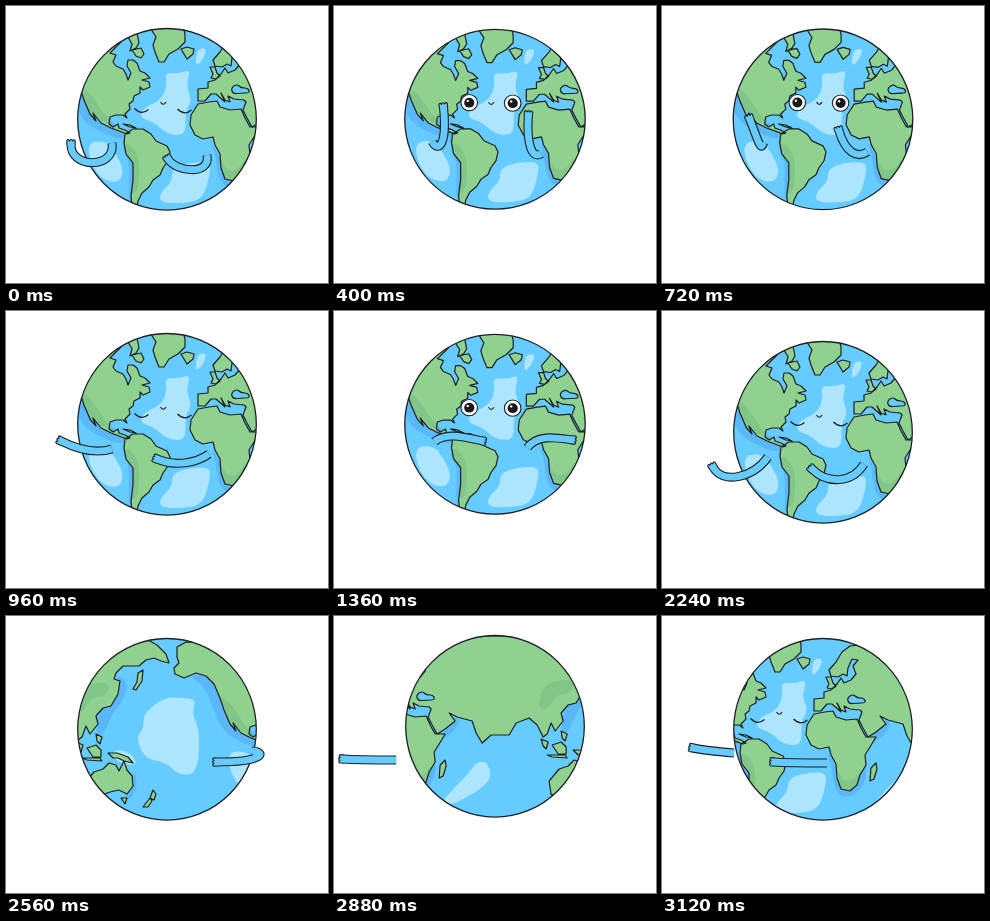
These frames come from a looping animation (322x277 px, 3200 ms). An HTML page with a canvas:

```html
<!DOCTYPE html>
<html lang="en">
<head>
<meta charset="utf-8">
<title>Dancing Earth</title>
<style>
html, body { margin: 0; width: 322px; height: 277px; overflow: hidden; background: #fff; }
canvas { display: block; }
</style>
</head>
<body>
<canvas id="stage" width="322" height="277"></canvas>
<script>
const ctx = document.getElementById('stage').getContext('2d');
const LOOP = 3200, STEP = 80, MAP_W = 420, CX = 161, CY = 113.3;
const INK = '#1d1f22', SEA = '#66ccff', DEEP = '#5ab8f8', LIGHT = '#ade5ff';
const LAND = '#8fd18f', LAND_DARK = '#81c588';

// Shapes facing the Atlantic, and those facing the Pacific (moved by EAST).
const EAST = 280;
const westLand = [
  // North America
  'M31 31L40 26L110 28L115 36L109 42L104 47L110 49L107 56L110 60L117 63L120 68L122 74L125 67L121 60L122 54L127 54L131 57L134 65L139 67L144 72L136 74L143 76L144 81L137 84L134 81L134 87L128 90L127 95L123 98L124 103L119 108L121 112L117 109L110 109L104 111L103 118L107 121L112 118L113 122L119 124L124 127L121 128L105 122L95 117L87 107L90 115L84 108L78 94L74 82L68 68L60 60L50 57L38 62L29 58L28 52L33 47L31 41Z',
  // Caribbean and Arctic islands
  'M117 118L124 119L130 122L124 121Z',
  'M122 31L131 27L133 37L130 42L124 45L126 38Z',
  'M126 44L135 42L138 48L135 52L130 50Z',
  // South America
  'M119 128L127 123L137 123L145 128L150 135L161 140L164 146L162 155L157 162L154 169L147 174L143 181L136 187L132 195L131 201L126 200L125 190L127 174L127 157L120 148L118 137Z',
  // Greenland, Iceland, Britain
  'M143 20L150 31L147 39L149 46L153 56L158 56L163 48L172 43L179 36L179 28L177 20Z',
  'M175 43L181 41L188 43L187 48L181 53L178 48Z',
  'M204 61L209 61L211 67L214 70L210 73L205 72L207 68Z',
  // Eurasia
  'M192 83L202 82L202 76L209 74L215 68L219 62L222 67L229 64L234 58L231 50L236 44L230 43L226 52L225 60L221 58L216 61L209 60L207 54L214 46L220 36L228 30L238 29L250 23L420 23L431 29L440 38L443 47L435 45L428 42L420 44L413 50L397 50L390 57L388 63L394 65L392 78L385 90L377 92L370 100L372 108L364 118L360 110L356 121L352 124L346 112L338 105L325 110L318 122L300 122L291 130L285 120L281 108L266 104L258 100L264 108L254 116L246 121L241 112L237 104L240 96L238 94L228 93L222 90L224 96L219 94L215 87L219 96L210 88L205 88L199 95L192 95Z',
  // Africa, Madagascar
  'M192 98L203 96L211 95L214 101L224 104L235 103L239 112L244 121L254 121L248 131L243 139L244 149L238 159L235 169L228 175L219 173L215 162L214 148L209 139L207 131L197 133L189 129L184 119L185 109Z',
  'M249 152L254 147L255 153L252 163L248 165Z'
].join('');
const eastLand = [
  'M137 54L136 65L130 74L127 73L131 66L132 57Z',
  'M90 118L96 121L94 128L91 125Z',
  'M81 132L90 129L95 134L95 141L87 141Z',
  'M70 126L77 129L75 136L72 133Z',
  'M76 142L94 142L96 145L81 144Z',
  'M102 137L111 137L122 141L127 147L118 145L112 142L107 142Z',
  'M78 168L88 156L97 153L103 147L110 149L113 155L118 145L121 154L126 160L127 170L121 178L113 174L104 176L96 179L80 182Z',
  'M115 182L121 182L119 188Z',
  'M147 174L150 178L148 184L144 182Z',
  'M144 182L146 185L142 191L137 191Z'
].join('');

const land = new Path2D(westLand);
land.addPath(new Path2D(eastLand), { e: EAST });

// Closed curve through the midpoints of a rough polygon.
function blob(text, dx = 0) {
  const n = text.split(' ').map(Number), path = new Path2D(), pts = [];
  for (let i = 0; i < n.length; i += 2) pts.push([n[i] + dx, n[i + 1]]);
  pts.forEach((p, i) => {
    const q = pts[(i + 1) % pts.length], mx = (p[0] + q[0]) / 2, my = (p[1] + q[1]) / 2;
    if (!i) {
      const z = pts[pts.length - 1];
      path.moveTo((p[0] + z[0]) / 2, (p[1] + z[1]) / 2);
    }
    path.quadraticCurveTo(p[0], p[1], mx, my);
  });
  return path;
}

const lights = [
  blob('159 66 172 68 185 63 180 80 186 94 179 106 180 129 162 129 148 116 134 112 137 102 155 94 161 80'),
  blob('166 163 182 157 204 156 204 168 197 193 180 197 154 197 154 187 166 176'),
  blob('82 136 100 135 109 146 118 164 113 177 96 174 84 156'),
  blob('192 43 201 42 197 54 190 60 190 51'),
  blob('286 148 278 160 262 176 248 192 262 192 300 170 298 150'),
  blob('137 98 158 81 180 82 190 84 186 98 193 112 193 142 188 159 171 158 160 146 139 143 130 122 138 112', EAST),
  blob('106 134 122 135 132 147 122 150 108 143', EAST)
];
const deeps = [
  blob('42 59 60 72 68 96 78 116 94 126 116 134 126 128 106 118 80 88 64 58'),
  blob('116 128 117 144 124 158 122 186 126 204 134 200 130 150'),
  blob('204 132 210 150 212 172 222 183 238 176 246 156 240 140 220 164'),
  blob('240 116 248 128 262 120 270 106 262 104'),
  blob('110 58 122 66 118 84 106 98 98 118 90 122 92 98 112 70', EAST),
  blob('128 152 132 172 122 186 118 176', EAST)
];
const darks = [
  blob('80 82 92 98 100 112 112 116 108 120 84 110 72 84'),
  blob('118 136 128 142 134 156 132 186 124 190 126 154 118 148'),
  blob('216 154 222 166 234 162 240 150 240 170 226 178 216 172'),
  blob('72 72 92 66 104 68 100 80 84 82 78 96 66 96', EAST)
];

// Each arm: shoulder, two control points, wrist.
const poses = {
  curl:   [106,137, 110,163, 64,163, 65,138,   201,149, 205,170, 170,166, 162,153],
  head:   [99,136, 104,146, 114,142, 110,101,  207,148, 198,154, 192,140, 194,109],
  out:    [106,138, 93,142, 75,140, 55,130,    203,143, 190,152, 170,156, 151,148],
  hip:    [108,140, 114,178, 97,180, 98,135,   202,141, 208,178, 189,180, 189,136],
  cross:  [101,131, 112,121, 130,126, 148,130, 193,137, 203,123, 222,127, 237,129],
  behind: [106,138, 90,160, 60,165, 51,148,    202,145, 190,165, 165,165, 150,150],
  back:   [106,135, 121,136, 118,146, 71,146,  202,145, 190,150, 165,150, 150,148],
  reach:  [112,137, 100,136, 80,134, 71,132,   205,147, 190,147, 165,147, 152,146]
};
const armKeys = [
  [0, 'curl'], [320, 'head'], [560, 'head'], [960, 'out'], [1160, 'hip'], [1320, 'cross'],
  [1680, 'cross'], [1920, 'hip'], [2160, 'behind'], [2320, 'behind'], [2480, 'back'],
  [2720, 'back'], [2880, 'reach'], [3120, 'reach'], [LOOP, 'curl']
].map(([t, name]) => [t, poses[name]]);
const eyeKeys = [
  [0, 0], [80, 0], [240, 1], [720, 1], [880, 0], [1040, 0], [1200, 1], [1840, 1], [2000, 0], [LOOP, 0]
];
const spinKeys = [[0, 0], [2240, 0], [2560, 140], [3120, 380], [LOOP, MAP_W]];
const bobKeys = [
  [0, 0], [2080, 0], [2240, 8], [2320, 8], [2480, 0], [2720, 0], [2800, -3], [2880, -3], [2960, 0], [LOOP, 0]
];

function at(keys, t) {
  const i = keys.findIndex(k => k[0] > t), [t0, a] = keys[i - 1], [t1, b] = keys[i];
  const u = (t - t0) / (t1 - t0), mix = (p, q) => p + (q - p) * u;
  return Array.isArray(a) ? a.map((v, j) => mix(v, b[j])) : mix(a, b);
}

function ink(width = 1.2) {
  ctx.strokeStyle = INK;
  ctx.lineWidth = width;
}

function drawMap() {
  const fillAll = (paths, color) => {
    ctx.fillStyle = color;
    paths.forEach(p => ctx.fill(p));
  };
  fillAll(deeps, DEEP);
  fillAll(lights, LIGHT);
  fillAll([land], LAND);
  ctx.save();
  ctx.clip(land);
  fillAll(darks, LAND_DARK);
  ctx.restore();
  ink();
  ctx.stroke(land);
  // Black Sea
  const lake = blob('225 82 231 78 235 82 242 82 244 87 235 87 227 88');
  ctx.fillStyle = SEA;
  ctx.fill(lake);
  ctx.stroke(lake);
}

function drawEye(x, y, open) {
  if (open < 0.1) {
    ink();
    ctx.beginPath();
    ctx.moveTo(x - 7, y + 6);
    ctx.quadraticCurveTo(x, y + 13, x + 7, y + 7);
    ctx.stroke();
    return;
  }
  const lid = y + 9 - 18 * open;
  const disc = (dx, dy, r, color) => {
    ctx.beginPath();
    ctx.arc(x + dx, y + dy, r, 0, 7);
    ctx.fillStyle = color;
    ctx.fill();
  };
  ctx.save();
  ctx.beginPath();
  ctx.rect(x - 10, lid, 20, 20);
  ctx.clip();
  disc(0, 0, 8.2, '#fff');
  ink(1.1);
  ctx.stroke();
  disc(0, 0, 5, '#17191b');
  disc(-1.5, -1.8, 1.2, '#fff');
  ctx.restore();
  if (open < 0.95) {
    ink(1.5);
    ctx.beginPath();
    ctx.moveTo(x - 9, lid);
    ctx.lineTo(x + 9, lid);
    ctx.stroke();
  }
}

function drawFace(open) {
  drawEye(135.5, 96.5, open);
  drawEye(178.5, 97, open);
  ink(1.1);
  ctx.beginPath();
  ctx.moveTo(154.5, 96);
  ctx.quadraticCurveTo(157.3, 100.5, 160, 96);
  ctx.stroke();
}

function drawArm([x0, y0, x1, y1, x2, y2, x3, y3]) {
  const arm = new Path2D();
  arm.moveTo(x0, y0);
  arm.bezierCurveTo(x1, y1, x2, y2, x3, y3);
  ink(9);
  ctx.stroke(arm);
  ctx.save();
  ctx.translate(x3, y3);
  ctx.rotate(Math.atan2(y3 - y2, x3 - x2));
  ctx.fillStyle = SEA;
  ink(1.1);
  const hand = new Path2D('M-1 -4L3 -4.3Q5.5 -3 3 -1.6Q6 0 3 1.4Q5.5 3 3 4.2L-1 4');
  ctx.fill(hand);
  ctx.stroke(hand);
  ctx.restore();
  ctx.strokeStyle = SEA;
  ctx.lineWidth = 6.8;
  ctx.stroke(arm);
}

function draw(t) {
  const spin = at(spinKeys, t), front = spin > MAP_W / 2 ? spin - MAP_W : spin;
  const squash = t < 1920 ? 0.5 - 0.5 * Math.cos(t / 960 * 2 * Math.PI) : 0;
  const pose = at(armKeys, t), arms = [pose.slice(0, 8), pose.slice(8)];
  const shifted = (dx, paint) => {
    ctx.save();
    ctx.translate(dx, 0);
    paint();
    ctx.restore();
  };
  const drawArms = (from, to) => shifted(front, () => arms.forEach(a => {
    const x = a[0] + front;
    if (x >= from && x < to) drawArm(a);
  }));

  ctx.fillStyle = '#fff';
  ctx.fillRect(0, 0, 322, 277);
  ctx.save();
  ctx.lineJoin = 'round';
  ctx.translate(CX, CY + at(bobKeys, t));
  ctx.scale(1 + 0.011 * squash, 1 - 0.011 * squash);
  ctx.translate(-CX, -CY);

  drawArms(60, 76);
  const globe = new Path2D();
  globe.ellipse(CX, CY, 89.3, 90.8, 0, 0, 7);
  ctx.fillStyle = SEA;
  ctx.fill(globe);
  ctx.save();
  ctx.clip(globe);
  for (const dx of [spin, spin - MAP_W]) shifted(dx, drawMap);
  shifted(front, () => drawFace(at(eyeKeys, t)));
  ctx.restore();
  ink(1.3);
  ctx.stroke(globe);
  drawArms(76, 252);
  ctx.restore();
}

function tick() {
  const t = performance.now() % LOOP;
  draw(Math.floor(t / STEP) * STEP);
  requestAnimationFrame(tick);
}
tick();
</script>
</body>
</html>
```
